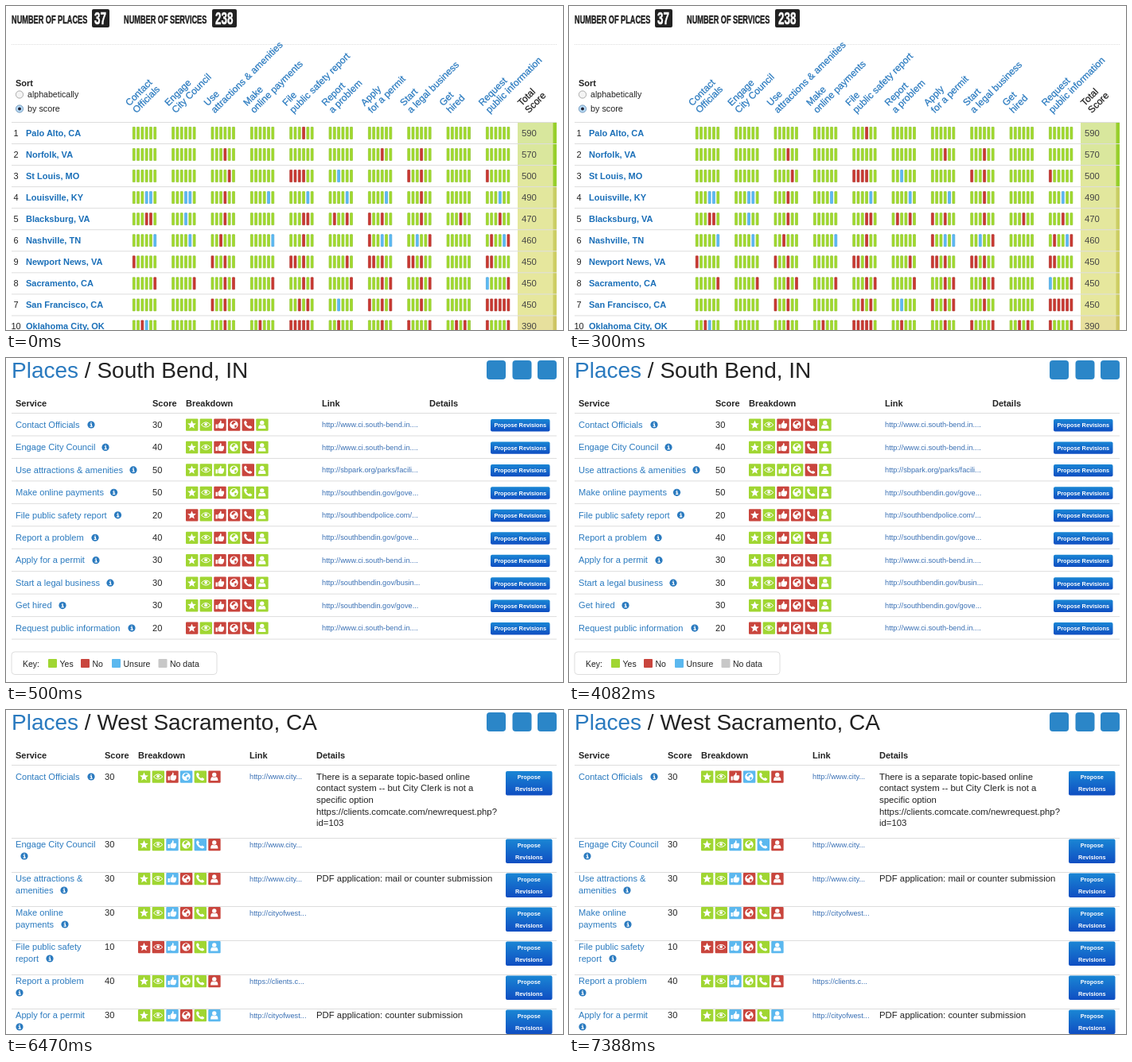
Write an HTML page that moves like this. It is 700 px wide and 408 px high and loops after 8 s.

```html
<!DOCTYPE html>
<html lang="en">
<head>
<meta charset="utf-8">
<title>Service scores</title>
<style>
html, body { margin: 0; width: 100%; height: 100%; overflow: hidden; background: #fff; }
svg { display: block; width: 700px; height: 408px; }
text { font-family: "Liberation Sans", Arial, sans-serif; white-space: pre; }
</style>
</head>
<body>
<svg viewBox="0 0 700 408">
  <defs>
    <linearGradient id="button" x2="0" y2="1">
      <stop stop-color="#1a86d4"/><stop offset="1" stop-color="#0f4ec2"/>
    </linearGradient>
    <g id="icon0"><path d="M7.5 2.2L9 5.8l3.9.3-3 2.5.9 3.8-3.3-2-3.3 2 .9-3.8-3-2.5L6 5.8z"/></g>
    <g id="icon1" fill="none" stroke="#fff"><path d="M1.8 7.7Q7.5 1.2 13.2 7.7Q7.5 13.6 1.8 7.7z"/><circle cx="7.5" cy="7.2" r="1.9" fill="#fff" stroke="none"/></g>
    <g id="icon2"><path d="M2.2 7h2.3v5.2H2.2zM5.2 7L7.6 4.4l.5-2.2q1.7.1 1.3 2.6l-.3 1h3q1.3.6.6 1.8q.5 1-.3 1.7q.2 1.1-.7 1.6q0 1.5-1.6 1.5H8L5.2 11.6z"/></g>
    <g id="icon3"><circle cx="7.5" cy="7.5" r="5.2"/><path d="M6.5 3.2l3.2.4-.9 1.8-1.6.6-.4 1.3-1.7.1-.9-1.2zM8.3 8l2.8.3-.6 2.2-1.8 1.3-.3-1.6z" fill="currentColor"/></g>
    <g id="icon4"><path d="M4.7 2.3L6.4 5 5.3 6.5q1.1 2 3.2 3.2L10 8.6l2.7 1.7q-.5 2.2-2.5 2.2Q7.6 12.4 4.9 9.8Q2.5 7.3 2.5 4.8Q2.6 2.7 4.7 2.3z"/></g>
    <g id="icon5"><circle cx="7.5" cy="5.1" r="2.7"/><path d="M2.8 12.6q0-4.6 2.7-4.7q2 1 4 0q2.7.1 2.7 4.7z"/></g>
  </defs>
</svg>
<script>
const LOOP = 8000;
const BLUE = '#2a7abf', INK = '#222', RULE = '#ddd';
const FILL = { g: '#a0d632', r: '#c9453d', b: '#5bb8ef', n: '#c8c8c8' };
const BAR = { g: ['#a2db2c', '#8cc32b'], r: ['#cb3a32', '#ae2a24'], b: ['#5dbcf5', '#459fd8'] };

const escape = s => String(s).replace(/&/g, '&amp;');
const text = (x, y, s, size = 11.1, fill = INK, extra = '') =>
  `<text x="${x}" y="${y}" font-size="${size}" fill="${fill}" ${extra}>${escape(s)}</text>`;
const bold = (x, y, s, fill = INK, size = 11, extra = '') =>
  text(x, y, s, size, fill, `font-weight="700" ${extra}`);
const rect = (x, y, w, h, fill, rx = 0, extra = '') =>
  `<rect x="${x}" y="${y}" width="${w}" height="${h}" rx="${rx}" fill="${fill}" ${extra}/>`;
const rule = (y, extra = '') => `<path d="M7 ${y}H692" stroke="${RULE}" ${extra}/>`;
const condensed = (x, y, s, size, fill) =>
  `<g transform="translate(${x} ${y}) scale(.6 1)">${bold(0, 0, s, fill, size, `stroke="${fill}" stroke-width=".5"`)}</g>`;

// Overview table
const headings = ['Contact|Officials', 'Engage|City Council', 'Use|attractions & amenities',
  'Make|online payments', 'File|public safety report', 'Report|a problem', 'Apply|for a permit',
  'Start|a legal business', 'Get|hired', 'Request|public information', 'Total|Score'];

// Marks: column, colour, then the bars in that column; all others are green.
const cities = [
  [1, 'Palo Alto, CA', 590, '4r3'],
  [2, 'Norfolk, VA', 570, '2r3 6r3 7r3'],
  [3, 'St Louis, MO', 500, '2r4 4r0123 5b2 7r03 9r0'],
  [4, 'Louisville, KY', 490, '0b34 1b34 2r3 3b4 4b4 5b4 6b4 7r3 9b3'],
  [5, 'Blacksburg, VA', 470, '0r34 1b3 2r3 4r34 5r14 6r03 7r3 8r3 9r3'],
  [6, 'Nashville, TN', 460, '0b5 1b4 2r2 3b5 4r3 6r0 6b35 7b2 7r5 9r15 9b4'],
  [9, 'Newport News, VA', 450, '0r0 2r03 4r013 5r4 6r013 7r013 9r01'],
  [8, 'Sacramento, CA', 450, '0r5 1r5 2r35 3r5 4r35 5r5 6r35 7r35 9b0 9r5'],
  [7, 'San Francisco, CA', 450, '2r03 4r24 5b2 6r035 7r3 9r012345'],
  [10, 'Oklahoma City, OK', 390, '0r2 0b3 2r3 3r2 4r01234 5r2 6r3 7r05 8r24 9r05']
];

function bars(marks, y) {
  const colour = {};
  for (const [col, key, ...spots] of marks.split(' '))
    for (const spot of spots) colour[col + spot] = key;
  let out = '';
  for (let col = 0; col < 10; col++)
    for (let i = 0; i < 6; i++) {
      const [fill, edge] = BAR[colour[`${col}${i}`] || 'g'];
      out += rect(159.3 + col * 49.35 + i * 5.3, y - 7.5, 2.9, 15, fill, .2, `stroke="${edge}" stroke-width=".7"`);
    }
  return out;
}

function radio(y, on) {
  return `<circle cx="17" cy="${y}" r="4.6" fill="${on ? '#b9dcf7' : '#f4f4f4'}" stroke="${on ? '#5b84ad' : '#999'}" stroke-width=".8"/>` +
    (on ? `<circle cx="17" cy="${y}" r="2" fill="#223"/>` : '');
}

function scoreCell(y, score) {
  const hue = 55 + (score - 390) * .085;
  return rect(643, y - 13.5, 49, 27.1, `hsl(${hue} 60% 76%)`) +
    rect(687.5, y - 13.5, 4.5, 27.1, score < 500 ? `hsl(${hue} 52% 60%)` : '#97cf2c') +
    text(648, y + 4, score, 11.3, '#444');
}

function overview() {
  let out = condensed(7, 22, 'NUMBER OF PLACES', 15.3, INK) + rect(108, 4, 22, 23, INK, 2) +
    condensed(111, 23, '37', 22.5, '#fff') + condensed(148, 22, 'NUMBER OF SERVICES', 15.3, INK) +
    rect(259, 4, 31, 23, INK, 2) + condensed(263, 23, '238', 22.5, '#fff') +
    rule(48.5, 'stroke-dasharray="1 1"') + bold(12, 101, 'Sort') + radio(111.5, false) + radio(129.5, true) +
    text(27, 115, 'alphabetically', 10.6) + text(27, 133, 'by score', 10.8);
  headings.forEach((label, i) => {
    const x = 155 + i * 49.3, fill = i < 10 ? BLUE : INK;
    label.split('|').forEach((line, n) => {
      out += `<g transform="translate(${x + n * 9} ${126.5 + n * 9}) rotate(-45)">` +
        `${text(0, 0, line, 12, fill, `stroke="${fill}" stroke-width=".25"`)}</g>`;
    });
  });
  cities.forEach(([rank, name, score, marks], i) => {
    const y = 160 + i * 27.05;
    out += scoreCell(y, score) + rule(y - 13.5) + text(12.5, y + 4, rank, 11, INK, 'text-anchor="middle"') +
      bold(25, y + 4, name, '#1a6fb8') + bars(marks, y);
  });
  return out;
}

// City pages
const info = (x, y) => `<circle cx="${x}" cy="${y}" r="4.6" fill="${BLUE}"/>` +
  `<path d="M${x - 1.3} ${y - .7}h1.7v2.8m-1.9 0h3.3M${x} ${y - 2.9}v1.1" fill="none" stroke="#fff" stroke-width="1.2"/>`;

const icons = (x, y, keys) => [...keys].map((key, i) =>
  `<g transform="translate(${x + i * 17.65} ${y - 7.6})" fill="#fff" color="${FILL[key]}">` +
  `${rect(0, 0, 15.4, 15.4, FILL[key], 1)}<use href="#icon${i}"/></g>`).join('');

function button(x, y, w, h, lines) {
  return rect(x, y, w, h, 'url(#button)', 2) + lines.map((line, i) =>
    bold(x + w / 2, y + 10.4 + i * 15, line, '#fff', 7.3, 'text-anchor="middle"')).join('');
}

function pageHead(city, columns) {
  const titles = ['Service', 'Score', 'Breakdown', 'Link', 'Details'];
  return `<text x="7" y="25" font-size="28" fill="${INK}"><tspan fill="${BLUE}">Places</tspan> / ${city}</text>` +
    [604, 636.5, 668].map(x => rect(x, 3, 24, 24, '#2b86c8', 4)).join('') +
    titles.map((title, i) => bold(columns[i], 61, title)).join('') + rule(69.5);
}

const ci = 'http://www.ci.south-bend.in....', gov = 'http://southbendin.gov/gove...';
const southBend = [
  ['Contact Officials', 107, 30, 'ggrrrg', ci],
  ['Engage City Council', 125, 40, 'ggrgrg', ci],
  ['Use attractions & amenities', 160, 50, 'ggggrg', 'http://sbpark.org/parks/facili...'],
  ['Make online payments', 135.5, 50, 'ggrggg', gov],
  ['File public safety report', 140.5, 20, 'rgrrrg', 'http://southbendpolice.com/...'],
  ['Report a problem', 112, 40, 'ggrgrg', gov],
  ['Apply for a permit', 113, 30, 'ggrrrg', ci],
  ['Start a legal business', 131, 30, 'ggrrrg', 'http://southbendin.gov/busin...'],
  ['Get hired', 71, 30, 'ggrrrg', gov],
  ['Request public information', 158, 20, 'rgrrrg', ci]
];

function southBendPage() {
  let out = pageHead('South Bend, IN', [12, 184, 226, 397, 532]);
  southBend.forEach(([service, infoX, score, keys, link], i) => {
    const y = 84 + i * 28.45;
    out += text(12, y + 3.7, service, 11.1, BLUE) + info(infoX, y) + text(184, y + 3.7, score) +
      icons(226, y, keys) + text(397, y + 3.2, link, 9.25, '#3a70b4') +
      button(609, y - 7, 74.5, 15.4, ['Propose Revisions']) + rule(y + 14);
  });
  out += rect(7, 370, 258, 28.5, '#fff', 4, `stroke="${RULE}"`) + text(21, 388.5, 'Key:', 10.5);
  [[53, 'g', 'Yes'], [94, 'r', 'No'], [133, 'b', 'Unsure'], [191.5, 'n', 'No data']].forEach(([x, key, label]) => {
    out += rect(x, 379, 11, 11, FILL[key], 1) + text(x + 14.5, 388.5, label, 10.5);
  });
  return out;
}

const cityLink = 'http://www.city...', westLink = 'http://cityofwest...';
const westSacramento = [
  ['Contact Officials', 107, 0, 30, 'ggrbgr', cityLink,
    'There is a separate topic-based online|contact system -- but City Clerk is not a|specific option|https://clients.comcate.com/newrequest.php?|id=103'],
  ['Engage City Council', 23, 1, 30, 'ggbgbr', cityLink, ''],
  ['Use attractions &|amenities', 73, 1, 30, 'ggbrgr', cityLink, 'PDF application: mail or counter submission'],
  ['Make online|payments', 74, 1, 30, 'ggbrgr', westLink, ''],
  ['File public safety|report', 55, 1, 10, 'rrbrgb', '', ''],
  ['Report a problem', 17, 1, 40, 'ggbggr', 'https://clients.c...', ''],
  ['Apply for a permit', 17, 1, 30, 'ggbrgb', westLink, 'PDF application: counter submission']
];

function westSacramentoPage() {
  const lines = (x, y, s, size, fill) =>
    s.split('|').map((line, i) => text(x, y + i * 14.6, line, size, fill)).join('');
  let out = pageHead('West Sacramento, CA', [12, 124, 166, 306, 390]);
  westSacramento.forEach(([service, infoX, infoLine, score, keys, link, details], i) => {
    const y = i ? 126.5 + i * 43 : 84;
    out += (i ? rule(y - 8) : '') + lines(12, y + 3.7, service, 11.1, BLUE) + info(infoX, y + infoLine * 14.5) +
      text(124, y + 3.7, score) + icons(166, y, keys) + text(306, y + 3.2, link, 9.25, '#3a70b4') +
      lines(390, y + 3.7, details, 11.35, INK) + button(628, y - 7, 58.5, 30.5, ['Propose', 'Revisions']);
  });
  return out;
}

const scenes = [[0, 500, overview], [500, 6470, southBendPage], [6470, LOOP, westSacramentoPage]];
const stage = document.querySelector('svg');
scenes.forEach(([start, end, draw]) => {
  const group = document.createElementNS('http://www.w3.org/2000/svg', 'g');
  group.innerHTML = draw();
  stage.append(group);
  const steps = [[0, start === 0], [start, true], [end, false], [LOOP, false]];
  group.animate(steps.map(([time, shown]) => ({
    offset: time / LOOP, opacity: shown ? 1 : 0, easing: 'step-end'
  })), { duration: LOOP, iterations: Infinity });
});
</script>
</body>
</html>
```
